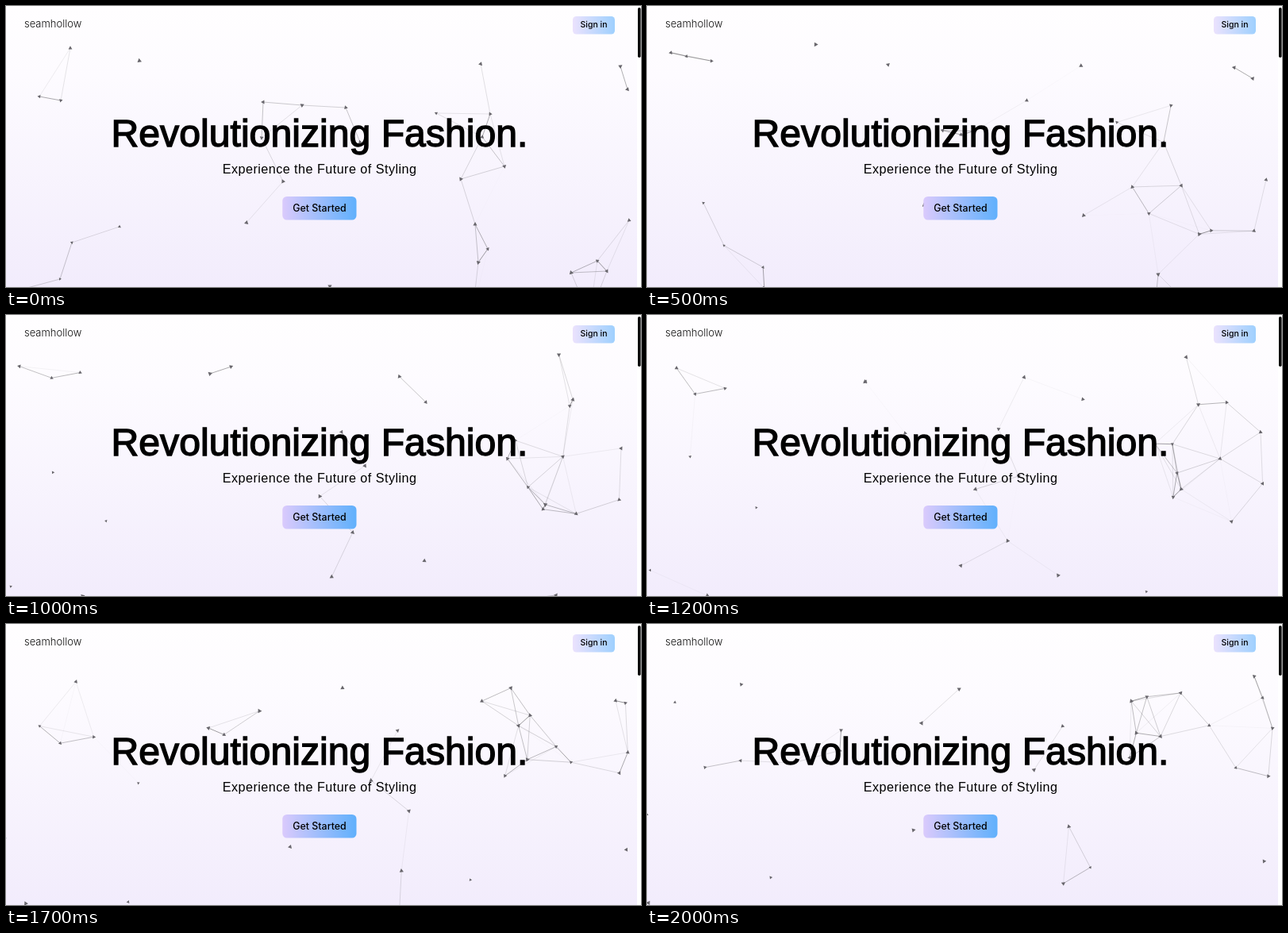
An HTML page that plays this animation: 800x354 px, repeating every 2.1 s.

```html
<!DOCTYPE html>
<html lang="en">
<head>
<meta charset="utf-8">
<title>Landing hero</title>
<style>
  html, body { margin: 0; width: 100%; height: 100%; overflow: hidden; background: #fff; }
  svg { display: block; width: 800px; height: 354px; }
  .display { font-family: "Liberation Sans", Arial, sans-serif; }
  .ui { font-family: Inter, Roboto, sans-serif; font-weight: 500; text-anchor: middle; }
</style>
</head>
<body>
<svg viewBox="0 0 800 354" xmlns="http://www.w3.org/2000/svg">
  <defs>
    <linearGradient id="page" x2="0" y2="1">
      <stop offset="0" stop-color="#fffeff"/>
      <stop offset=".25" stop-color="#fdfbff"/>
      <stop offset="1" stop-color="#f2ecfc"/>
    </linearGradient>
    <linearGradient id="primary">
      <stop offset="0" stop-color="#dacafc"/>
      <stop offset="1" stop-color="#60b0fc"/>
    </linearGradient>
    <linearGradient id="secondary">
      <stop offset="0" stop-color="#ebe2fd"/>
      <stop offset="1" stop-color="#9fd0fe"/>
    </linearGradient>
  </defs>
  <rect width="795" height="354" fill="url(#page)"/>
  <g id="links" stroke="#222" stroke-width=".8"></g>
  <path id="nodes" fill="#68666c"/>

  <text x="23" y="27" font-family="Inter, Roboto, sans-serif" font-weight="300" font-size="13" fill="#111">seamhollow</text>
  <rect x="714" y="13" width="53" height="22.5" rx="4.5" fill="url(#secondary)"/>
  <text class="ui" x="740.5" y="27.3" font-size="10.5">Sign in</text>

  <text class="display" x="132.5" y="177" font-size="48.2" stroke="#000" stroke-width="1.4">Revolutionizing Fashion.</text>
  <text class="display" x="272.7" y="211" font-size="16.2" letter-spacing=".45">Experience the Future of Styling</text>
  <rect x="348.3" y="240" width="93.2" height="29.5" rx="5.5" fill="url(#primary)"/>
  <text class="ui" x="395" y="258.6" font-size="12.4">Get Started</text>

  <rect x="795" width="5" height="354" fill="#fff"/>
  <rect x="796" y="2" width="3.6" height="63" rx="1.8" fill="#0b0b0b"/>
</svg>
<script>
const LOOP = 2100, STEP = 100, SPEED = 10.25, REACH = 83.3;
const AREA = { left: -2, right: 793, top: 46, bottom: 401 };

// x, y, heading in degrees, radius
const particles = [
  [81, 53, 173.5, 2.8], [42, 114, -81.3, 2.5], [69, 119, -76.2, 2.6],
  [168, 69, -29.8, 3.2], [324, 121, -113.3, 2.9], [373, 125, 39.4, 3],
  [428, 128, -10.2, 2.8], [598, 73, 177.5, 3], [542, 135, 13, 2.4],
  [610, 136, -12.1, 2.7], [600, 165, 7.5, 2.8], [628, 202, 28.2, 2.9],
  [573, 218, 116.6, 3], [591, 275, -66.6, 2.9], [607, 306, -60.4, 2.6],
  [595, 323, 17, 3], [785, 270, -95.6, 2.8], [757, 334, -81.3, 2.8],
  [745, 321, -131.9, 2.7], [712, 336, -108.5, 3.1], [783, 105, -147.5, 3],
  [774, 76, 17.4, 3], [349, 221, 31.1, 3], [303, 273, -25.8, 3.1],
  [83, 298, -103.5, 2.2], [68, 344, -55.5, 2], [143, 278, 86.4, 2.3],
  [485, 400, -136.8, 3], [735, 391, 149.4, 2.1], [199, 357, -178.4, 3.1],
  [16, 358, 95.6, 2], [322, 166, -10.5, 2.8], [446, 171.5, -169.4, 2.8],
  [588, 385, 0, 2.6], [408, 353, 163, 3]
];

const links = document.getElementById('links');
const nodes = document.getElementById('nodes');
const rad = deg => deg * Math.PI / 180;

// Reflects a straight path off both walls
function bounce(value, min, max) {
  const span = max - min;
  const p = (((value - min) % (2 * span)) + 2 * span) % (2 * span);
  return min + (p > span ? 2 * span - p : p);
}

function place([x, y, heading, size], i, step) {
  const travel = SPEED * step;
  return {
    x: bounce(x + travel * Math.cos(rad(heading)), AREA.left, AREA.right),
    y: bounce(y + travel * Math.sin(rad(heading)), AREA.top, AREA.bottom),
    size,
    turn: -90 + (i * 37) % 120 + (i % 2 ? 20 : -20) * step
  };
}

function triangle({ x, y, size, turn }) {
  const corners = [0, 120, 240].map(a =>
    (x + size * Math.cos(rad(turn + a))).toFixed(2) + ' ' +
    (y + size * Math.sin(rad(turn + a))).toFixed(2));
  return 'M' + corners.join('L') + 'Z';
}

function linkMarkup(points) {
  let markup = '';
  points.forEach((a, i) => points.slice(i + 1).forEach(b => {
    const distance = Math.hypot(a.x - b.x, a.y - b.y);
    if (distance >= REACH) return;
    const opacity = (0.7 * (1 - distance / REACH)).toFixed(3);
    markup += `<line x1="${a.x}" y1="${a.y}" x2="${b.x}" y2="${b.y}" opacity="${opacity}"/>`;
  }));
  return markup;
}

let shown = -1;
function render(time) {
  const step = Math.floor((time % LOOP) / STEP);
  if (step !== shown) {
    shown = step;
    const points = particles.map((p, i) => place(p, i, step));
    links.innerHTML = linkMarkup(points);
    nodes.setAttribute('d', points.map(triangle).join(''));
  }
}

const start = performance.now();
function tick() {
  render(performance.now() - start);
  requestAnimationFrame(tick);
}
tick();
</script>
</body>
</html>
```
